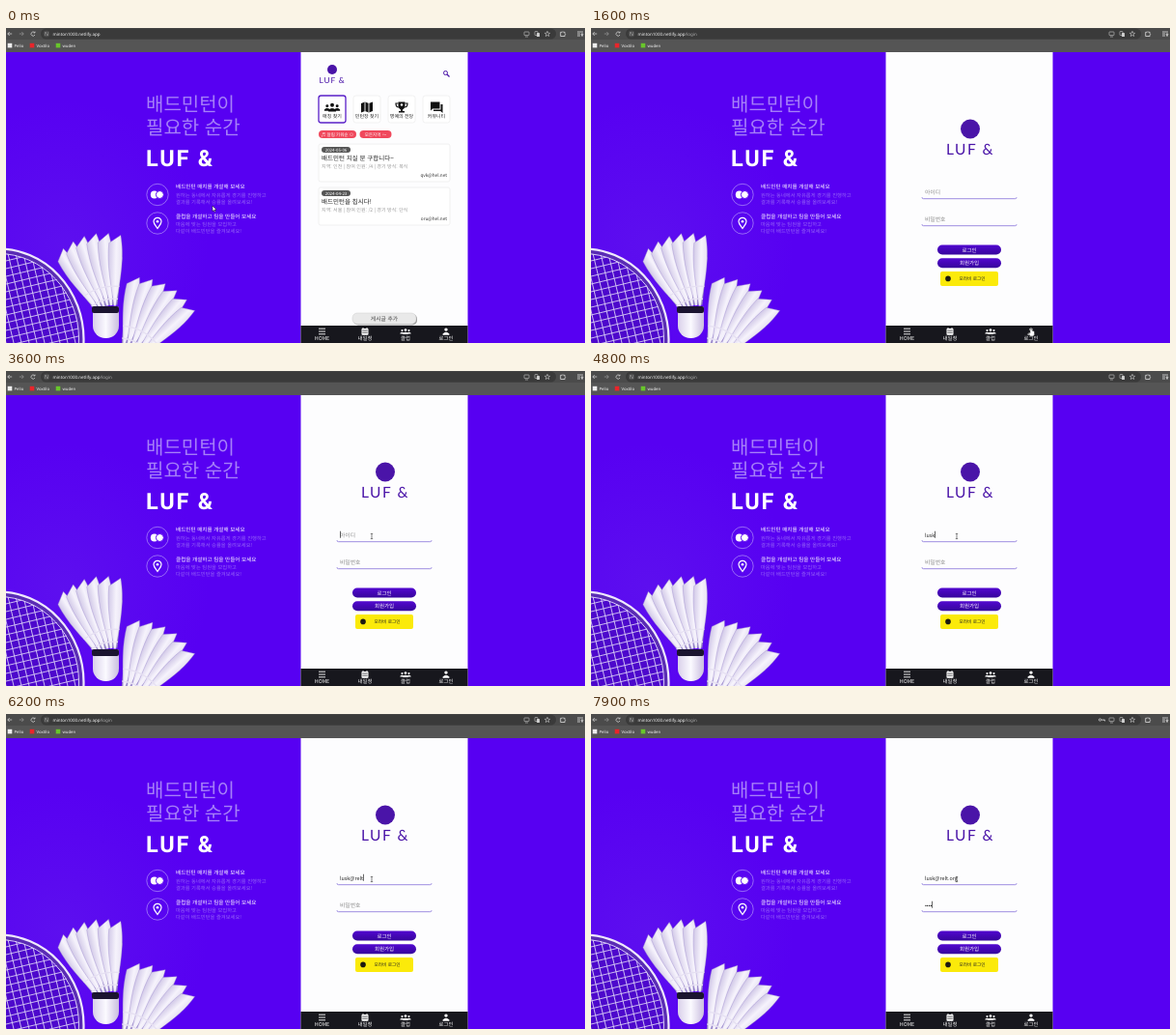
These frames come from a looping animation (600 by 326 pixels, 8 s). An HTML page with a canvas:

```html
<!DOCTYPE html>
<html lang="ko">
<head>
<meta charset="utf-8">
<style>
html, body { margin: 0; width: 100%; height: 100%; overflow: hidden; background: #5700f2; }
canvas { display: block; width: 600px; height: 326px; }
</style>
</head>
<body>
<canvas id="stage" width="600" height="326"></canvas>
<script>
const g = document.getElementById('stage').getContext('2d');
const KR = '"Noto Sans CJK KR", "Noto Sans CJK", "Noto Sans", sans-serif';
const LATIN = '"Noto Sans", sans-serif';
const BRAND = 'LUF &';
const PURPLE = '#4a14a8';
const LOOP = 8000;

const LOGIN_AT = 1350, FOCUS_AT = 3400, TAB_AT = 7100;
const EMAIL = 'lusk@relt.org';
const emailKeys = [4000, 4200, 4450, 4650, 5150, 5450, 5650, 5850, 6050, 6400, 6600, 6750, 6900];
const passKeys = [7350, 7480, 7600, 7740];
// Pointer stops: time, x, y
const pointer = [[0, 214, 184], [100, 214, 184], [800, 466, 317], [1000, 466, 317],
  [1250, 456, 313], [1900, 456, 313], [2900, 379, 171], [LOOP, 379, 171]];

g.textRendering = 'geometricPrecision';

function text(s, x, y, size, color, { font = KR, weight = 400, align = 'left', spacing = 0 } = {}) {
  g.font = `${weight} ${size}px ${font}`;
  g.letterSpacing = spacing + 'px';
  g.textAlign = align;
  g.textBaseline = 'alphabetic';
  g.fillStyle = color;
  g.fillText(s, x, y + size * .38);
}

function box(x, y, w, h, r, fill, stroke, line = 1) {
  g.beginPath();
  g.roundRect(x, y, w, h, r);
  if (fill) { g.fillStyle = fill; g.fill(); }
  if (stroke) { g.strokeStyle = stroke; g.lineWidth = line; g.stroke(); }
}

function oval(x, y, rx, ry, fill, stroke, line = 1) {
  g.beginPath();
  g.ellipse(x, y, rx, ry, 0, 0, 7);
  if (fill) { g.fillStyle = fill; g.fill(); }
  if (stroke) { g.strokeStyle = stroke; g.lineWidth = line; g.stroke(); }
}

const dot = (x, y, r, fill, stroke, line) => oval(x, y, r, r, fill, stroke, line);

function path(d, x, y, fill, stroke, line = 1) {
  const p = new Path2D(d);
  g.save();
  g.translate(x, y);
  if (fill) { g.fillStyle = fill; g.fill(p); }
  if (stroke) { g.strokeStyle = stroke; g.lineWidth = line; g.stroke(p); }
  g.restore();
}

function gradient(x0, y0, x1, y1, ...colors) {
  const f = g.createLinearGradient(x0, y0, x1, y1);
  colors.forEach((c, i) => f.addColorStop(i / (colors.length - 1), c));
  return f;
}

function browser(t, login) {
  box(0, 0, 600, 12, 0, '#4b4b4b');
  box(0, 12, 600, 13, 0, '#555');
  path('M2.2 0H-2.2M-.3-2L-2.2 0-.3 2', 4, 6, null, '#ddd', .7);
  path('M-2.2 0H2.2M.3-2L2.2 0 .3 2', 16, 6, null, '#999', .7);
  path('M1.6-1.4A2.1 2.1 0 1 0 2 1M2-2.4V-1H.6', 28, 6, null, '#ddd', .7);
  box(36, .5, 534, 11, 5.5, '#3a3a3a');
  dot(42, 6, 3.4, '#4b4b4b');
  path('M-1.8-1H0M1-1H1.8M-1.8 1H-1M0 1H1.8', 42, 6, null, '#ddd', .7);
  const host = 'minton1000.netlify.app';
  text(host, 48.5, 6, 4.5, '#f4f4f4', { font: LATIN });
  const end = 48.5 + g.measureText(host).width;
  if (login) text('/login', end, 6, 4.5, '#aaa', { font: LATIN });
  if (t >= TAB_AT) {
    dot(527.5, 6, 1.2, null, '#ddd', .7);
    path('M0 0H3.5V1.5M2 0V1', 529, 6, null, '#ddd', .7);
  }
  box(537, 4, 5, 3.6, .5, null, '#ccc', .6);
  path('M-1.5 0H1.5', 539.5, 9, null, '#ccc', .6);
  box(548, 3.5, 3, 4, .5, null, '#ccc', .6);
  box(550, 5, 3, 4, .5, '#ccc');
  path('M0-2.7L.7-.8 2.7-.7 1.2.5 1.7 2.5 0 1.4-1.7 2.5-1.2.5-2.7-.7-.7-.8Z', 561, 6, null, '#ccc', .6);
  path('M-2.3-1.2H-.8A.9.9 0 0 1 .8-1.2H2.1V.2A.9.9 0 0 1 2.1 1.7V3H-2.3Z', 577, 5.5, null, '#ddd', .8);
  path('M-3-2H3M-3 0H0M-3 2H0M1 0L3 0 2 2.5Z', 595, 6, null, '#ddd', .8);
  [['Pelio', 4, '#eee'], ['Voxtilo', 27, '#e8252b'], ['wuden', 54, '#68c62b']].forEach(([s, x, c]) => {
    box(x - 2.3, 15.8, 4.6, 4.6, 0, c);
    text(s, x + 4.4, 18.2, 4.3, '#eee', { font: LATIN });
  });
}

function feather(x, y, angle, len, width) {
  g.save();
  g.translate(x, y);
  g.rotate(angle);
  g.beginPath();
  g.moveTo(len * .3, -1);
  g.bezierCurveTo(len * .55, -width * .6, len * .7, -width * 1.1, len * .92, -width * .9);
  g.lineTo(len, width * .5);
  g.bezierCurveTo(len * .8, width, len * .6, width * .7, len * .3, 1);
  g.fillStyle = gradient(0, -width, 0, width, '#cfc6e6', '#f6f3fc', '#e2dcf0');
  g.fill();
  g.strokeStyle = '#9a88cc88';
  g.lineWidth = .7;
  g.stroke();
  g.restore();
}

function shuttle(x, y, from, to, len, n) {
  const rad = Math.PI / 180, a = from * rad, b = to * rad;
  const band = (r, color, line) => {
    g.beginPath();
    g.arc(x, y, len * r, a, b);
    g.strokeStyle = color;
    g.lineWidth = line;
    g.stroke();
  };
  band(.53, '#8f7cc4', len * .46);
  for (let i = 0; i < n; i++) {
    const k = i / (n - 1);
    feather(x, y, a + .08 + (b - a - .16) * k, len * (.97 + .03 * Math.sin(k * Math.PI)), 8.5);
  }
  for (const r of [.36, .48]) band(r, '#e6e0f2', 1.3);
}

function photo() {
  const glow = g.createRadialGradient(60, 225, 0, 60, 225, 150);
  glow.addColorStop(0, '#6a30e850');
  glow.addColorStop(1, '#6a30e800');
  g.fillStyle = glow;
  g.fillRect(0, 75, 305, 251);
  g.save();
  g.beginPath();
  g.ellipse(-8, 322, 86, 91, 0, 0, 7);
  g.clip();
  g.fillStyle = '#4d08cc';
  g.fillRect(0, 225, 100, 101);
  g.strokeStyle = '#d9cdf6';
  g.lineWidth = .9;
  g.beginPath();
  for (let i = -12; i < 24; i++) {
    g.moveTo(i * 8, 225); g.lineTo(i * 8 + 24, 326);
    g.moveTo(0, 225 + i * 8); g.lineTo(100, 201 + i * 8);
  }
  g.stroke();
  g.restore();
  oval(-8, 322, 86, 91, null, '#5a2cb4', 4);
  oval(-8, 322, 88.5, 93.5, null, '#efe9fc', 2.2);
  oval(-8, 322, 83.5, 88.5, null, '#d9cdf6', 1);
  shuttle(112, 319, -127, -84, 108, 6);
  box(90, 288, 27, 33, [2, 2, 13, 13], gradient(90, 0, 117, 0, '#d9d0ea', '#fbfaff', '#c9bddf'));
  box(89, 288, 28, 7, 2, '#1b1430');
  shuttle(117, 359, -85, -38, 106, 6);
}

function intro() {
  const soft = '#a680f8', pale = '#9564f6';
  text('배드민턴이', 145, 78.3, 20, soft, { weight: 300 });
  text('필요한 순간', 145, 102, 20, soft, { weight: 300 });
  text(BRAND, 145, 134.3, 23.5, '#fff', { font: 'Roboto, sans-serif', weight: 700, spacing: 1.8 });
  for (const y of [172.5, 202]) dot(157, y, 11.2, null, '#a680f8', .8);
  dot(153.8, 172.5, 4, '#fff');
  dot(159.4, 172.5, 4, '#fff', '#5700f2', 1);
  path('M0 5.5C-2.5 2-4 .5-4-1.7A4 4 0 0 1 4-1.7C4 .5 2.5 2 0 5.5Z', 157, 202, null, '#fff', 1.2);
  dot(157, 200.3, 1.3, '#fff');
  const head = { weight: 500 };
  text('배드민턴 매치를 개설해 보세요', 176, 164, 5.6, '#fff', head);
  text('원하는 동네에서 자유롭게 경기를 진행하고', 176, 172.5, 5.3, pale);
  text('결과를 기록해서 승률을 올려보세요!', 176, 179.5, 5.3, pale);
  text('클럽을 개설하고 팀을 만들어 보세요', 176, 195, 5.6, '#fff', head);
  text('마음에 맞는 팀원을 모집하고', 176, 203.3, 5.3, pale);
  text('다같이 배드민턴을 즐겨보세요!', 176, 210.3, 5.3, pale);
}

function logo(x, y, r, size) {
  dot(x, y, r, PURPLE);
  text(BRAND, x, y + r * 2.1, size, PURPLE, { font: 'Lato, sans-serif', align: 'center', spacing: size * .1 });
}

function person(x, y, s, color) {
  dot(x, y - 2 * s, 1.8 * s, color);
  path(`M${-3.6 * s} ${4 * s}V${2.6 * s}Q0 ${-.8 * s} ${3.6 * s} ${2.6 * s}V${4 * s}Z`, x, y, color);
}

function group(x, y, s, color) {
  person(x - 4.7 * s, y + .3 * s, s * .75, color);
  person(x + 4.7 * s, y + .3 * s, s * .75, color);
  person(x, y, s, color);
}

function post(y, date, title, info, mail) {
  box(324, y, 136, 39, 2, '#fff', '#ececec', .8);
  box(327, y + 3, 30, 6, 3, '#555');
  text(date, 342, y + 6, 4.4, '#fff', { align: 'center' });
  text(title, 327, y + 15, 6.5, '#222', { weight: 500 });
  text(info, 327, y + 23, 5.05, '#999');
  text(mail, 457, y + 32, 4.7, '#333', { align: 'right' });
}

function home() {
  logo(338, 43, 5, 8.3);
  dot(455.5, 46.5, 2, null, PURPLE, 1);
  path('M0 0L2.5 2.5', 457, 48, null, PURPLE, 1.2);
  ['매칭 찾기', '민턴장 찾기', '명예의 전당', '커뮤니티'].forEach((s, i) => {
    const x = 324 + i * 36;
    box(x, 70, 28, 28, 2.5, '#fff', i ? '#eee' : '#5a20c8', i ? .8 : 1.3);
    text(s, x + 14, 91, 5, '#222', { align: 'center', weight: 500 });
  });
  group(338, 82, 1.1, '#111');
  path('M-6-4L-2-5.5 2-4 6-5.5V4L2 5.5-2 4-6 5.5Z', 374, 82, '#111');
  path('M-2-5.5V4M2-4V5.5', 374, 82, null, '#fff', .9);
  path('M-3.5-5.5H3.5V-1Q3 2 1 2.4V4H3V5.5H-3V4H-1V2.4Q-3 2-3.5-1Z', 410, 82, '#111');
  path('M-3.5-4H-6Q-6 0-3 0M3.5-4H6Q6 0 3 0', 410, 82, null, '#111', 1.2);
  dot(410, 79.5, 1.2, '#fff');
  path('M-6-5.5H3.5V1.5H-4L-6 3.5Z', 446, 82, '#111');
  path('M4.5-3H6.5V6L4.3 4H-3V2.5H4.5Z', 446, 82, '#111');

  box(324, 106, 39, 8, 4, '#f0485c');
  text('♬ 알림 키워순 ⊙', 343.5, 110, 4.5, '#fff', { align: 'center' });
  box(366.5, 106, 33, 8, 4, '#f0485c');
  text('모든지역 ～', 383, 110, 4.5, '#fff', { align: 'center' });
  post(120, '2024-05-06', '배드민턴 치실 분 구합니다~', '지역: 인천 | 참여 인원: /4 | 경기 방식: 복식', 'qvk@hel.net');
  post(165, '2024-04-23', '배드민턴을 칩시다!', '지역: 서울 | 참여 인원: /2 | 경기 방식: 단식', 'oru@hel.net');
  box(360, 296, 66, 11.5, 5, '#999');
  box(359, 295, 66, 11.5, 5, '#e9e9e9', '#ccc', .5);
  text('게시글 추가', 392, 300.7, 5.8, '#444', { align: 'center' });
}

function field(value, hint, y, caret) {
  const size = 5.4;
  text(value || hint, 346, y, value ? size : 5.8, value ? '#222' : '#8a8a8a');
  const w = value ? g.measureText(value).width : 0;
  if (caret) box(346 + w, y - 3.7, .7, 7, 0, '#222');
  path('M0-1.5Q0 0 1.5 0H96.5Q98 0 98-1.5', 343, y + 7.2, null, '#8570da', .8);
}

function loginPage(t) {
  logo(393, 104.5, 10, 15.5);
  const typed = keys => keys.filter(k => k <= t).length;
  const focus = t >= TAB_AT ? 2 : t >= FOCUS_AT ? 1 : 0;
  const last = Math.max(...[FOCUS_AT, TAB_AT, ...emailKeys, ...passKeys].filter(k => k <= t));
  const blink = focus && (t - last) % 1000 < 500;
  field(EMAIL.slice(0, typed(emailKeys)), '아이디', 169.5, blink && focus === 1);
  field('•'.repeat(typed(passKeys)), '비밀번호', 197.5, blink && focus === 2);
  [['로그인', 224.5], ['회원가입', 238.2]].forEach(([s, y]) => {
    box(359, y, 66, 10, 5, gradient(0, y, 0, y + 10, '#5208d0', '#36059c'));
    text(s, 392, y + 5, 5.5, '#fff', { align: 'center', weight: 500 });
  });
  box(362, 252, 60, 15, 2, '#fbea0a');
  dot(370, 259.4, 2.8, '#1c1a10');
  text('모라비 로그인', 395, 259.6, 4.7, '#222', { align: 'center' });
}

function nav() {
  box(305.5, 308, 173, 18, 0, '#17171d');
  path('M-3.5-2.8H3.5M-3.5 0H3.5M-3.5 2.8H3.5', 327.5, 314, null, '#fff', .9);
  box(368.5, 311, 7, 6.8, .8, '#fff');
  path('M-2-3.8V-2M2-3.8V-2', 372, 314, null, '#fff', 1);
  path('M-2.7-1H2.7M-2.7 1.2H2.7', 372, 314, null, '#17171d', .7);
  group(414, 314, .75, '#fff');
  person(456, 314, .95, '#fff');
  [['HOME', 327.5], ['내일정', 372], ['클럽', 414], ['로그인', 456]].forEach(([s, x]) =>
    text(s, x, 321.3, 5.4, '#fff', { align: 'center' }));
}

function cursor(t) {
  const i = pointer.findIndex(p => p[0] > t);
  const [t0, x0, y0] = pointer[i - 1], [t1, x1, y1] = pointer[i];
  const k = (t - t0) / (t1 - t0), e = k * k * (3 - 2 * k);
  const x = x0 + (x1 - x0) * e, y = y0 + (y1 - y0) * e;
  if (t >= LOGIN_AT && y < 178)
    path('M-1.2-2.6H1.2M0-2.6V2.6M-1.2 2.6H1.2', x, y, null, '#333', .6);
  else if (y > 310 && x < 462 && t > 1000)
    path('M0-2Q1-2.5 1 0L3.5 1V4L2.5 6H-1L-3 2.5-1 3V-1Z', x, y, '#fff', '#222', .5);
  else
    path('M0 0V5.6L1.3 4.4 2.2 6.4 3.1 6 2.2 4H4Z', x, y, '#fff', '#111', .5);
}

function draw(t) {
  g.fillStyle = '#5700f2';
  g.fillRect(0, 0, 600, 326);
  photo();
  intro();
  const login = t >= LOGIN_AT;
  box(305.5, 25, 173, 301, 0, '#fdfdfe');
  login ? loginPage(t) : home();
  nav();
  browser(t, login);
  cursor(t);
}

const start = performance.now();
function frame() {
  draw((performance.now() - start) % LOOP);
  requestAnimationFrame(frame);
}
frame();
</script>
</body>
</html>
```
